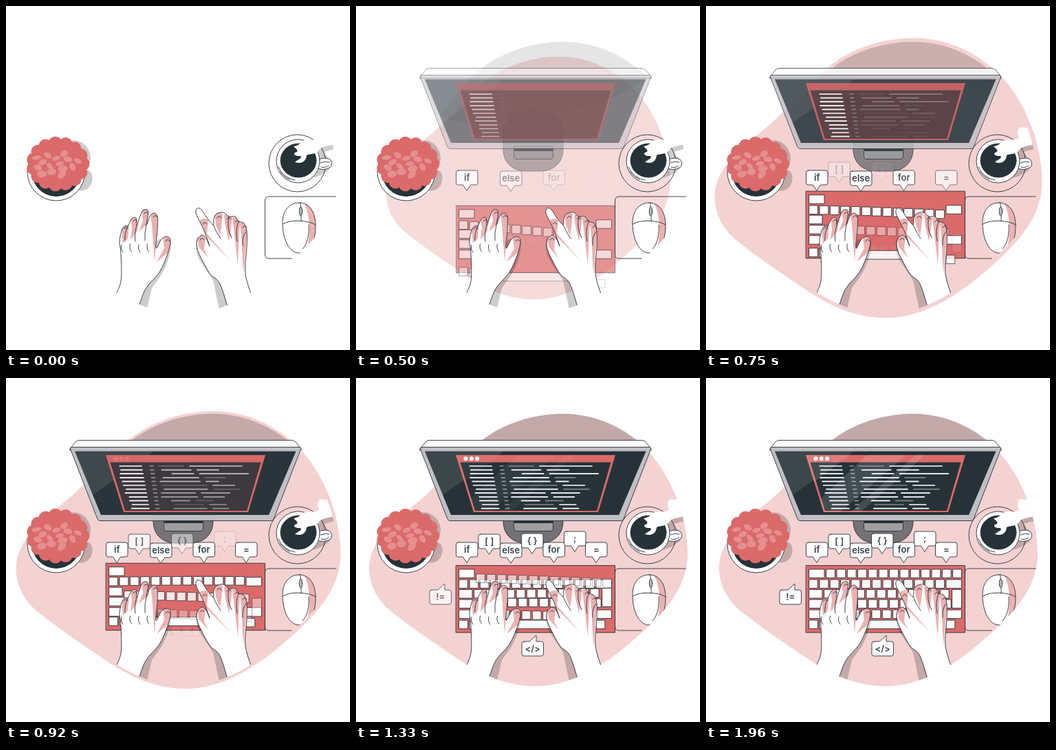
An HTML page for the animation above (2000 ms loop, 500 px wide and 500 px high).

```html
<!DOCTYPE html>
<html lang="en">
<head>
<meta charset="utf-8">
<title>Coding desk</title>
<style>
  html, body { margin: 0; width: 100%; height: 100%; overflow: hidden; background: #fff; }
  svg { display: block; width: 100%; height: 100%; }
  .line { fill: none; stroke: #263238; stroke-width: .9; stroke-linecap: round; stroke-linejoin: round; }
  .white { fill: #fff; }
  .dark { fill: #263238; }
  .red { fill: #db6a6a; }
  .skin { fill: #ebb1b1; }
  .shade { fill: #000; fill-opacity: .2; }
  text { font: 600 13px Inter, "Open Sans", sans-serif; text-anchor: middle; fill: #37414a; }
</style>
</head>
<body>
<svg viewBox="0 0 500 500">
  <defs>
    <path id="blob" d="M300 52C360 52 405 83 432 115C462 152 482 205 482 255C482 310 442 348 395 388C357 420 310 448 262 448C205 448 165 420 130 396C100 376 70 355 47 336C30 320 19 300 19 276C19 235 60 205 95 176C125 150 150 118 180 93C210 68 255 52 300 52Z"/>
    <path id="body" d="M426 286C441 286 450 299 450 320C450 343 440 359 426 359C412 359 402 340 402 315C402 298 411 286 426 286Z"/>
    <path id="pane" d="M145 112H377L352 195H171Z"/>
    <path id="left"/>
    <path id="right"/>
    <clipPath id="inBlob"><use href="#blob"/></clipPath>
    <clipPath id="inBody"><use href="#body"/></clipPath>
    <clipPath id="inPane"><use href="#pane"/></clipPath>
    <clipPath id="inHands"><use href="#left"/><use href="#right"/></clipPath>
  </defs>

  <use href="#blob" fill="#f4d2d2" data-zoom="-.02"/>

  <!-- monitor -->
  <path class="shade" data-fade="0 1" d="M122 160C145 125 160 109 180 93C210 68 255 52 300 52C355 52 396 77 422 102C390 150 165 185 122 160Z"/>
  <path class="line" style="fill:#757275" data-fade="0 1" d="M214 185C214 165 230 153 258 153S301 165 301 185V208C301 230 285 240 268 240H247C230 240 214 230 214 208Z"/>
  <path class="line" style="fill:#a09ea1" data-fade="0 1" d="M229.500 204H286.500V219Q286.500 222.500 283 222.500H233Q229.500 222.500 229.500 219Z"/>
  <path class="dark" data-fade="0 1" d="M230 207H286V211H230Z"/>
  <path class="line white" data-fade="0 1" d="M93 103L101 93Q103 90.500 107 90.500H415Q419 90.500 421 93L429 103V105H93Z"/>
  <path class="line" style="fill:#bfbfc4" data-fade="0 1" d="M93.500 103Q93 100.500 96 100.500H426Q429.500 100.500 428.500 103.500L389 205Q388 207.500 385 207.500H137Q134 207.500 133 205Z"/>
  <path class="dark" data-fade="0 1" d="M100 106.500H421.500L382 199H138Z"/>
  <path class="white" fill-opacity=".1" data-fade="0 1" d="M100 106.500H215L126 170Z"/>
  <use href="#pane" class="red" data-fade="0 1"/>
  <path class="dark" data-fade=".15 1" d="M151.500 122.500H370.500L350 193H173Z"/>
  <g id="code"></g>
  <g clip-path="url(#inPane)">
    <path class="white" fill-opacity=".13" data-fade=".95 .95" d="M145 112H209L148 158ZM240 106H298L190 199H142ZM312 106H325L220 199H205Z"/>
  </g>

  <path class="line red" d="M145.500 272.500H376.500V370H145.500Z" data-rise="0 70"/>
  <g id="keys"></g>
  <g id="bubbles"></g>

  <g clip-path="url(#inBlob)">
    <!-- mouse and pad -->
    <path class="line" d="M484 277H382Q376.500 277 376.500 283V361Q376.500 367 382 367H415"/>
    <use href="#body" class="white"/>
    <path class="skin" clip-path="url(#inBody)" d="M431 284C442 296 443 330 438 352L452 345V284Z"/>
    <use href="#body" class="line"/>
    <path class="line" d="M402.500 317C412 310 440 311 450 318M428 286V292M429 305V313M440 318C441 333 438 346 431 353"/>
    <ellipse class="line" style="fill:#b8b8bb" cx="428.500" cy="298.500" rx="2.200" ry="6.500"/>

    <!-- coffee -->
    <circle class="line" cx="423.500" cy="228.500" r="41.500"/>
    <path class="shade" d="M440 208L484 196V206L462 212L474 230C470 242 458 246 446 250Z"/>
    <path class="line white" d="M452 224C458 221 467 220 471 223C475 228 474 233 470 235C465 238 458 238 453 236Z"/>
    <path class="line" d="M457 228Q463 225 470 227M458 234Q464 236 469 232"/>
    <circle class="line white" cx="424.500" cy="225.500" r="31.500"/>
    <path class="line" d="M396 234A30 30 0 0 0 420 253M399 241Q404 249 412 252"/>
    <ellipse class="line dark" cx="425" cy="224.500" rx="26" ry="24.500"/>
    <path class="white" d="M418 204C425 203 429 199 432 196C440 192 452 197 455 191C452 185 452 179 457 176C464 178 472 176 486 168V199C474 203 462 202 456 208C452 216 443 214 437 217C436 226 430 230 420 227C424 223 431 222 428 218C421 218 417 216 420 213C427 211 422 208 418 204Z"/>

    <!-- hands -->
    <path class="shade" d="M237 336C242 340 240 350 238 361C230 390 220 398 212 410L204 444H188L220 340Z"/>
    <path class="shade" d="M278 335C274 350 277 362 283 372L301 399L311 446L332 436L320 400Z"/>
    <use href="#left" class="white"/>
    <use href="#right" class="white"/>
    <g clip-path="url(#inHands)"><path id="tint" class="skin"/></g>
    <use href="#left" class="line"/>
    <use href="#right" class="line"/>
    <path id="creases" class="line"/>
  </g>

  <!-- plant -->
  <path class="shade" d="M92 196C110 192 122 206 123 219C124 230 116 236 114 237C124 238 127 246 125 255C122 267 112 270 105 268Z"/>
  <circle class="line white" cx="73" cy="241" r="42"/>
  <circle class="dark" cx="73" cy="242" r="35"/>
  <g id="flower"></g>
</svg>

<script>
const byId = id => document.getElementById(id);
const fill = (id, parts) => { byId(id).innerHTML = parts.join(''); };
const range = n => [...Array(n).keys()];
let seed = 5;
const random = () => (seed = seed * 16807 % 2147483647) / 2147483647;
const between = (a, b) => a + random() * (b - a);

// Hands: smooth outlines through key points
function smooth(id, text) {
  const n = text.split(' ').map(Number);
  const pts = range(n.length / 2).map(i => [n[2 * i], n[2 * i + 1]]);
  const at = i => pts[Math.min(Math.max(i, 0), pts.length - 1)];
  const handle = (i, sign) => at(i).map((v, k) => v + sign * (at(i + 1)[k] - at(i - 1)[k]) / 6);
  const curves = range(pts.length - 1).map(i => `C${handle(i, 1)} ${handle(i + 1, -1)} ${at(i + 1)}`);
  byId(id).setAttribute('d', `M${at(0)}${curves.join('')}`);
}
smooth('left', '157 424 167 400 167 360 165 342 169 324 175 319 177 320 183 309 189 308 190 319 194 308 199 297 206 297 206 306 204 318 209 306 215 301 220 306 220 325 218 352 226 339 234 335 239 341 235 360 223 387 203 411 191 443');
smooth('right', '358 424 348 389 350 350 350 328 346 316 338 313 333 306 324 306 316 300 306 302 302 309 301 318 292 308 284 296 278 294 276 301 283 316 289 329 296 349 291 338 285 333 278 340 278 353 286 371 297 390 311 404 324 444');

// Each finger: tip and the point where its tint and crease run out
const fingers = [
  [173, 318, 170, 345], [187, 307, 181, 340], [203, 296, 193, 328], [216, 301, 216, 372], [234, 336, 219, 372],
  [288, 311, 327, 371], [309, 302, 311, 334], [323, 304, 324, 342], [335, 308, 337, 376], [346, 316, 345, 390], [284, 334, 294, 366]
];
byId('tint').setAttribute('d', fingers.map(([x, y, u, v]) =>
  `M${x - 6} ${y}Q${x} ${y - 4} ${x + 6} ${y}L${x + 4} ${y + 20}L${u} ${v}L${x - 4} ${y + 16}Z`).join(''));
byId('creases').setAttribute('d',
  fingers.map(([x, y]) => `M${x - 2} ${y + 6}q3-5 6 0`).join('') +
  range(4).map(i => `M${168 + i * 12.5} ${347 - i % 2}q-2 6 2 11`).join('') +
  'M177 320Q172 330 173 341M190 319Q186 332 188 342M204 318Q201 330 202 341' +
  'M301 318Q305 328 312 338M324 306Q320 322 328 337M338 313Q333 326 336 342M349 328Q343 334 344 348');

// Code lines
const codeLine = (i, a, b, color, start) => {
  const y = 128 + i * 5.6;
  return `<path d="M${a} ${y}H${b}" stroke="${color}" stroke-width="1.700" stroke-linecap="round" data-fade="${start + i * .012} .6"/>`;
};
fill('code', [
  ...range(12).flatMap(i => {
    const split = between(258, 295), end = 360 - i * 1.5;
    const greyFirst = i % 5 === 0;
    return [
      codeLine(i, between(160, 168) + i * 1.6, 197 + i, '#fff', .1),
      codeLine(i, 209 + i * .8, 214 + i * .8, '#8c9295', .3),
      codeLine(i, i % 4 ? between(224, 250) : 222 + i / 2, split, greyFirst ? '#7d8588' : '#fff', .52),
      codeLine(i, split + 9, between(split + 25, end), greyFirst || i % 3 ? '#fff' : '#7d8588', .52)
    ];
  }),
  ...range(3).map(i =>
    `<circle class="white" cx="${159.5 + i * 8.3}" cy="117.300" r="3" data-fade=".8 .6"/>`)
]);

// Keyboard: small keys ripple in, wide keys fill both ends of a row
const pitch = 15.33;
const key = (x, y, w, start = 0, dy = 70, h = 12.5) =>
  `<rect class="line white" x="${x}" y="${y}" width="${w}" height="${h}" data-rise="${start} ${dy}"/>`;
function keyRow(x, y, count, start, dy, gap = () => false) {
  const end = x + count * pitch;
  return [
    x > 150 ? key(150, y, x - 153) : '',
    end < 352 ? key(end, y, 371.5 - end) : '',
    ...range(count).map(i => gap(i) ? '' : key(x + i * pitch, y, 12.5, start + i * .009, dy))
  ];
}
fill('keys', [
  ...keyRow(150, 293, 13, .01, 70),
  ...keyRow(150, 352, 14.4 | 0, .07, 70, i => i > 2 && i < 11),
  key(203, 352, 106, .12),
  ...keyRow(172, 307.5, 12, .3, 30),
  ...keyRow(175, 322, 12, .5, 30),
  ...keyRow(180, 337, 11, .66, 30),
  key(358, 307.5, 13.5, .5, 30, 27),
  ...keyRow(175, 278, 13, .815, 30)
]);

// Speech bubbles appear one after another; the last two point up
const bubble = ([label, x, y, tail], i) => {
  const top = tail ? `h${tail}l10-9l0 9H${x + 28.5}` : 'h25.500';
  const bottom = tail ? 'h-25.500' : 'h-7.500l-5.500 8.500l-5.500-8.500h-7';
  return `<g data-fade="${.15 + i * .106} .5">
    <path class="line white" d="M${x + 3} ${y}${top}q3 0 3 3v15q0 3-3 3${bottom}q-3 0-3-3v-15q0-3 3-3Z"/>
    <text x="${x + 15.75}" y="${y + 15}">${label}</text></g>`;
};
fill('bubbles', [
  ['if', 145.5, 239], ['else', 209.5, 240], ['for', 272, 239], ['=', 333.5, 239],
  ['[ ]', 178, 227], ['{ }', 240.5, 226], [';', 302.5, 223],
  ['&lt;/&gt;', 241, 383, 8], ['!=', 107, 308, 9]
].map(bubble));

// Flower: ring of lobes, petals on a golden-angle spiral
const ellipse = (x, y, rx, ry, attrs) => `<ellipse cx="${x}" cy="${y}" rx="${rx}" ry="${ry}" ${attrs}/>`;
fill('flower', [
  ellipse(75, 230, 38, 32, 'class="red"'),
  ...range(15).map(i => {
    const a = i / 15 * 2 * Math.PI;
    return ellipse(75.5 + 36 * Math.cos(a), 229.5 + 30 * Math.sin(a), 10, 10, 'class="red"');
  }),
  ...range(15).map(i => {
    const a = i * 2.4, r = Math.sqrt((i + .5) / 15);
    const x = 72 + 35 * r * Math.cos(a), y = 229 + 19 * r * Math.sin(a);
    return ellipse(x, y, between(5, 8), between(3, 5), `fill="#e68f8f" transform="rotate(${between(-70, 70)} ${x} ${y})"`);
  })
]);

// cubic-bezier(.36, -.01, .5, 1.38)
const cubic = (s, a, b) => 3 * (1 - s) ** 2 * s * a + 3 * (1 - s) * s * s * b + s ** 3;
const clamp = v => Math.min(1, Math.max(0, v));
const easeInOut = v => v * v * (3 - 2 * v);
function overshoot(x) {
  if (x <= 0 || x >= 1) return clamp(x);
  let lo = 0, hi = 1;
  for (let i = 0; i < 18; i++) {
    const mid = (lo + hi) / 2;
    if (cubic(mid, .36, .5) < x) lo = mid; else hi = mid;
  }
  return cubic(lo, -.01, 1.38);
}

const motions = {
  fade(el, t, start, duration) {
    el.setAttribute('opacity', easeInOut(clamp((t - start) / duration)));
  },
  rise(el, t, start, distance) {
    const p = overshoot(t - start);
    el.setAttribute('opacity', clamp(p) ** 1.5);
    el.setAttribute('transform', `translate(0 ${distance * (1 - p)})`);
  },
  zoom(el, t, start) {
    const p = overshoot(t - start);
    el.setAttribute('opacity', clamp(p));
    el.setAttribute('transform', `translate(250 250) scale(${.5 + p / 2}) translate(-250 -250)`);
  }
};
const parts = Object.keys(motions).flatMap(kind =>
  [...document.querySelectorAll(`[data-${kind}]`)].map(el =>
    t => motions[kind](el, t, ...el.dataset[kind].split(' ').map(Number))));

const begin = performance.now();
function loop() {
  const t = (performance.now() - begin) % 2000 / 1000;
  for (const move of parts) move(t);
  requestAnimationFrame(loop);
}
loop();
</script>
</body>
</html>
```
